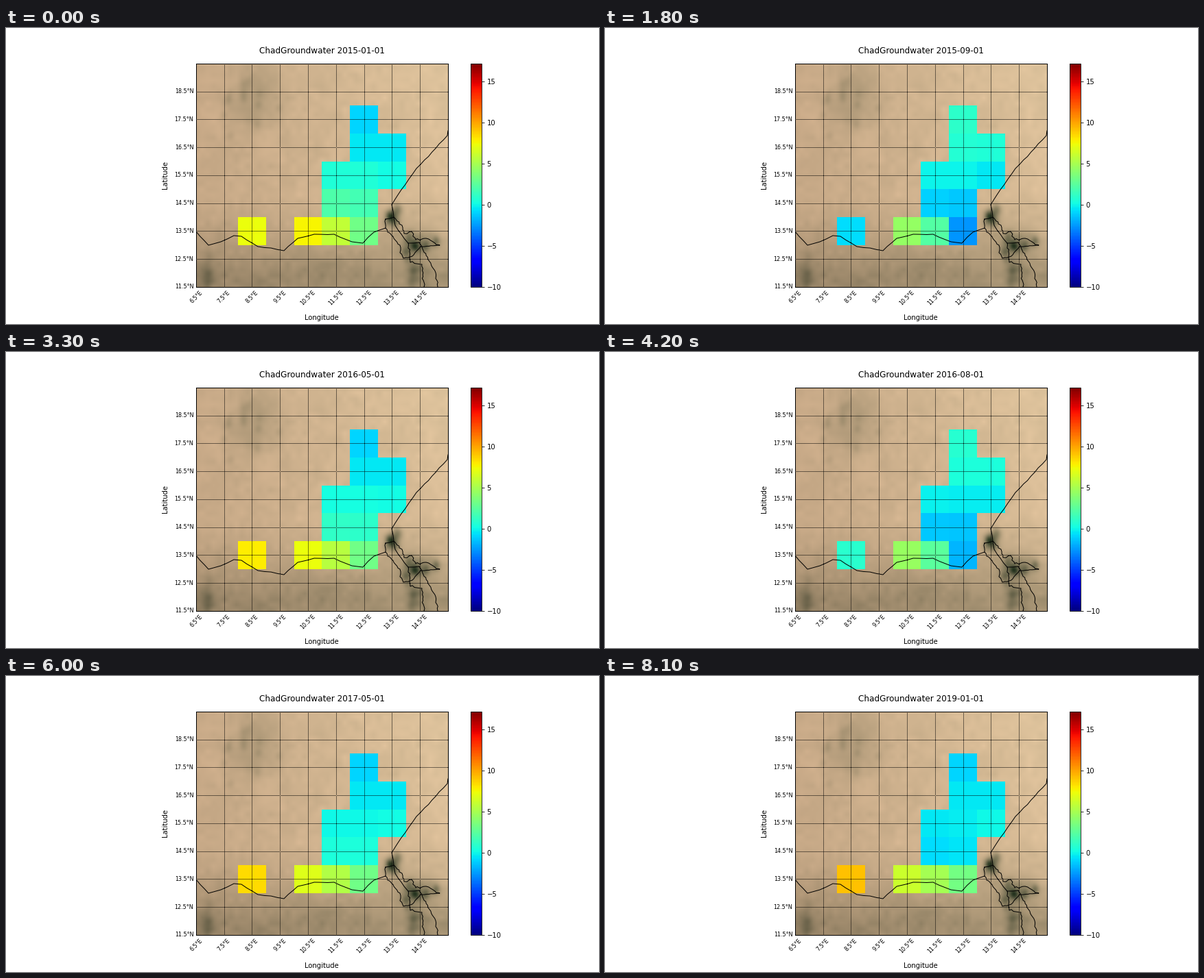
A matplotlib script for the animation above (8400 ms loop, 864 by 432 pixels).

```python
import numpy as np
import matplotlib.pyplot as plt
from matplotlib.animation import FuncAnimation

W, H, DPI = 864, 432, 72
DEG = 40.77                       # pixels per degree
LEFT, TOP = 276.9, 51.84
WIDE, TALL = 9 * DEG, 8 * DEG
RIGHT, BOTTOM = LEFT + WIDE, TOP + TALL
rng = np.random.default_rng(4)
plt.rcParams["font.family"] = "DejaVu Sans"

# Months with an observation
MONTHS = {
    2015: (1, 2, 3, 4, 7, 8, 9, 12),
    2016: (1, 2, 3, 5, 6, 7, 8, 11, 12),
    2017: (1, 3, 4, 5, 6),
    2018: (6, 7, 10, 11, 12),
    2019: (1,),
}
DATES = [(y, m) for y, months in MONTHS.items() for m in months]

# Longitudes of the covered cells in each row of latitude
ROWS = {13: (8, 10, 11, 12), 14: (11, 12), 15: (11, 12, 13), 16: (12, 13), 17: (12,)}

# Key points of the borders and of the lake shore, in pixels
BORDERS = [
    [(277, 297), (295, 317), (313, 312), (332, 303), (343, 304), (367, 319),
     (405, 325), (425, 307), (449, 301), (478, 301), (504, 312), (520, 314),
     (536, 298), (553, 292)],
    [(644, 150), (643, 157), (598, 205), (576, 236), (562, 258), (567, 288),
     (586, 314), (602, 313)],
]
SHORES = [
    [(553, 279), (565, 276), (577, 288), (580, 300), (591, 297), (597, 309),
     (612, 307), (632, 317), (604, 319), (592, 333), (579, 336), (574, 317),
     (553, 292), (553, 279)],
    [(586, 314), (589, 342), (606, 345), (609, 378)],
    [(602, 313), (615, 338), (626, 357), (629, 378)],
]


def px(lon):
    return LEFT + (lon - 6.5) * DEG


def py(lat):
    return TOP + (19.5 - lat) * DEG


def box(x, y, w, h):
    return [x / W, 1 - (y + h) / H, w / W, h / H]


def spread(grid, h, w):
    """Stretch a coarse grid linearly to h by w."""
    rows, cols = grid.shape
    xs, ys = np.linspace(0, cols - 1, w), np.linspace(0, rows - 1, h)
    wide = np.array([np.interp(xs, range(cols), r) for r in grid])
    return np.array([np.interp(ys, range(rows), c) for c in wide.T]).T


def terrain():
    h, w = round(TALL), round(WIDE)
    y, x = np.mgrid[:h, :w]
    east, south = x / w, y / h
    x, y = x + LEFT, y + TOP

    def blob(cx, cy, sx, sy):
        return np.exp(-((x - cx) / sx) ** 2 / 2 - ((y - cy) / sy) ** 2 / 2)

    # Sand brightens to the north-east, savanna darkens the south
    savanna = np.clip((south - 0.6) / 0.35, 0, 1) ** 1.5
    img = (np.array([199, 169, 135])
           + (east * (1 - 0.5 * south))[..., None] * np.array([24, 27, 22])
           - savanna[..., None] * np.array([46, 36, 31]))

    # Mountains, lake and south-west corner: soft core with random spots
    dark = np.zeros((h, w))
    for cx, cy, sx, sy, depth in [(360, 100, 28, 32, 0.18), (563, 277, 8, 9, 0.3),
                                  (598, 314, 17, 12, 0.4), (602, 355, 14, 12, 0.22),
                                  (292, 358, 10, 18, 0.16)]:
        dark += depth * 0.7 * blob(cx, cy, sx, sy)
        for _ in range(12):
            dx, dy = rng.normal(0, 0.8, 2)
            dark += depth * 0.4 * blob(cx + dx * sx, cy + dy * sy, 4, 5)
    for cell, amp in ((24, 0.015), (8, 0.015)):
        grain = spread(rng.normal(0, 1, (h // cell, w // cell)), h, w)
        dark += amp * grain * (1 + savanna)
    img *= 1 - dark[..., None] * np.array([1.0, 0.86, 0.95])
    return np.clip(img / 255, 0, 1)


def roughen(points, step=3, amp=0.7):
    """Subdivide a polyline and jitter the new points."""
    out = []
    for a, b in zip(points, points[1:]):
        a, b = np.array(a, float), np.array(b, float)
        n = max(1, int(np.hypot(*(b - a)) / step))
        out.append(a)
        out += [a + (b - a) * k / n + rng.normal(0, amp, 2) for k in range(1, n)]
    return np.array(out + [points[-1]])


def level(lon, lat, year, month):
    """Dry-season level, a slow drift and the swing of the rains."""
    d, r = lon - 8, lat - 13
    belt = np.exp(-4 * r)                       # southern row only
    dry = 1.1 - 0.5 * r + belt * (7.1 - 0.31 * d ** 2)
    drift = (0.5 * belt * np.cos(np.pi * d / 2) * np.exp(-0.2 * d)
             - 0.8 * np.exp(-(d - 3.4) ** 2 - (r - 1) ** 2))
    swing = -5.3 + 3 * r - 0.3 * r ** 2 + belt * (2.3 - (d - 2.3) ** 2)
    rains = np.exp(-((month - 9) / 1.6) ** 4)
    return dry + drift * (year + (month - 1) / 12 - 2017) + swing * rains


def field(date):
    grid = np.full((5, 6), np.nan)
    for lat, lons in ROWS.items():
        for lon in lons:
            grid[lat - 13, lon - 8] = level(lon, lat, *date)
    return np.ma.masked_invalid(grid)


fig = plt.figure(figsize=(W / DPI, H / DPI), dpi=DPI, facecolor="white")
ax = fig.add_axes(box(LEFT, TOP, WIDE, TALL))
ax.imshow(terrain(), extent=(LEFT, RIGHT, BOTTOM, TOP), aspect="auto",
          interpolation="bilinear")
mesh = ax.pcolormesh(px(np.arange(8, 15)), py(np.arange(13, 19)), field(DATES[0]),
                     cmap="jet", vmin=-10, vmax=17.17, zorder=2)
ax.set(xlim=(LEFT, RIGHT), ylim=(BOTTOM, TOP), xticks=[], yticks=[])
for spine in ax.spines.values():
    spine.set_linewidth(1)

# The half-pixel dash offset keeps the dots crisp
dotted = dict(color="black", lw=1, ls=(0.5, (1, 1)), zorder=3)
for lon in np.arange(6.5, 15):
    ax.plot([px(lon)] * 2, [BOTTOM, TOP], **dotted)
    ax.text(px(lon), BOTTOM + TALL / 100, f"{lon:g}°E", size=8, rotation=45,
            ha="center", va="top")
for lat in np.arange(11.5, 19):
    ax.plot([LEFT, RIGHT], [py(lat)] * 2, **dotted)
    ax.text(LEFT - WIDE / 100, py(lat), f"{lat:g}°N", size=8,
            ha="right", va="center")

for line in BORDERS:
    ax.plot(*roughen(line, step=8, amp=0.4).T, color="black", lw=1, zorder=4)
for line in SHORES:
    ax.plot(*roughen(line).T, color="black", lw=1, zorder=4)

title = ax.set_title("", size=12, pad=15)
ax.set_xlabel("Longitude", size=10, labelpad=40)
ax.set_ylabel("Latitude", size=10, labelpad=40)

bar = fig.colorbar(mesh, cax=fig.add_axes(box(677.16, TOP, TALL / 20, TALL)))
bar.set_ticks(range(-10, 16, 5))


def draw(i):
    year, month = DATES[i]
    title.set_text(f"ChadGroundwater {year}-{month:02d}-01")
    mesh.set_array(field(DATES[i]))
    return title, mesh


anim = FuncAnimation(fig, draw, frames=len(DATES), interval=300, repeat=True,
                     repeat_delay=0)
plt.show()
```
